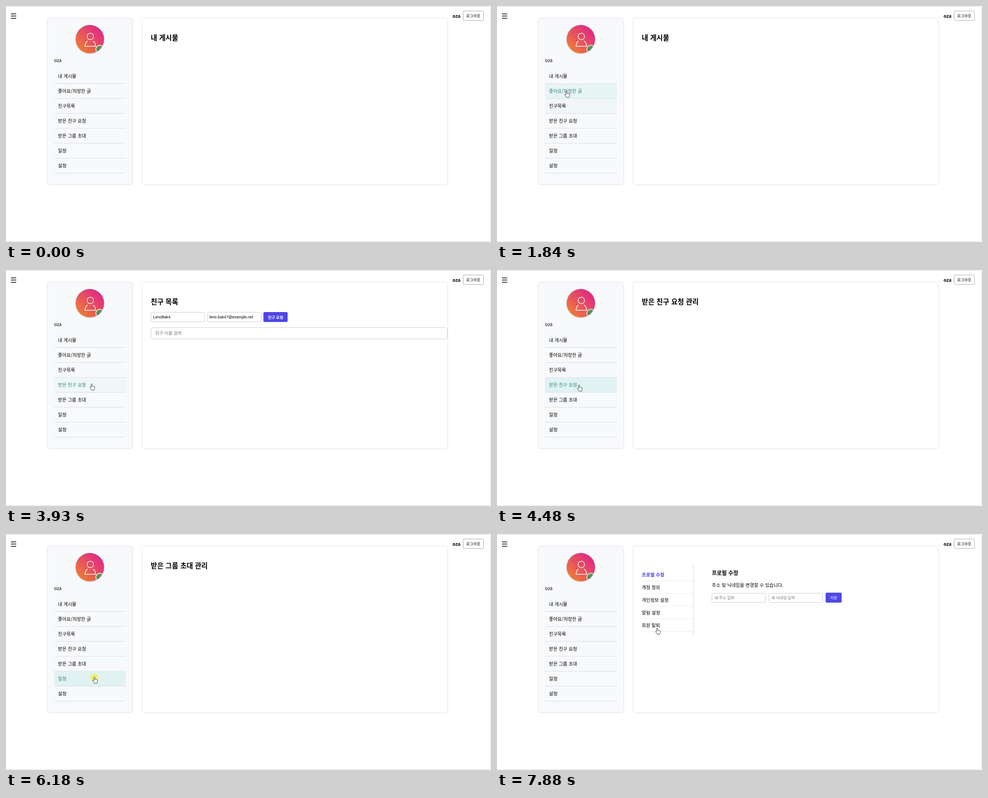
An HTML page for the animation above (8000 ms loop, 1073 px wide and 522 px high).

```html
<!DOCTYPE html>
<html lang="ko">
<head>
<meta charset="utf-8">
<style>
  html, body { margin: 0; width: 100%; height: 100%; overflow: hidden; background: #fff; }
  svg { display: block; width: 1073px; height: 522px; font-family: "Noto Sans CJK KR", "Noto Sans CJK", "Noto Sans", sans-serif; }
  .mono { font-family: "Liberation Sans", Arial, sans-serif; }
</style>
</head>
<body>
<svg id="stage" viewBox="0 0 1073 522"></svg>
<script>
const LOOP = 8000, FADE = 200;
const BODY = 10.24, SMALL = 8.53, TITLE = 15.36;
const INK = '#000', HOVER_INK = '#34807c', ACCENT = '#4f46e5', HINT = '#757575';

const text = (x, y, s, size = BODY, fill = INK, extra = '') =>
  `<text x="${x}" y="${y}" font-size="${size}" fill="${fill}" ${extra}>${s}</text>`;
const bold = (x, y, s, size, fill) => text(x, y, s, size, fill, 'font-weight="700"');
const box = (x, y, w, h, r, fill, stroke = 'none') =>
  `<rect x="${x}" y="${y}" width="${w}" height="${h}" rx="${r}" fill="${fill}" stroke="${stroke}"/>`;
const line = (d, stroke, width = 1) => `<path d="${d}" fill="none" stroke="${stroke}" stroke-width="${width}"/>`;
const title = s => bold(320.3, 75.6, s, TITLE);
const field = (x, y, h = 21) => box(x, y, 119, h, 3, '#fff', '#ccc');

const menu = ['내 게시물', '좋아요/저장한 글', '친구목록', '받은 친구 요청', '받은 그룹 초대', '일정', '설정'];
const tabs = ['프로필 수정', '계정 정보', '개인정보 설정', '알림 설정', '회원 탈퇴'];

const friends = title('친구 목록') +
  field(320.5, 93.5) + text(325.5, 107.3, 'LenoBak4', SMALL, INK, 'class="mono"') +
  field(445.5, 93.5) + text(450, 107.3, 'leno.bak47@example.net', SMALL, INK, 'class="mono"') +
  box(569.5, 93, 53.5, 22, 3, ACCENT) + bold(579.5, 107.5, '친구 요청', SMALL, '#fff') +
  box(320.5, 127.5, 656, 25, 5, '#fff', '#ccc') + text(330, 142.7, '친구 이름 검색', 9.6, HINT);

const settings = tabs.map((s, i) => {
  const y = 94 + 28 * i;
  return (i ? text(320.3, y, s) : bold(320.3, y, s, BODY, '#4338dd')) +
    line(`M320 ${y + 9.5}H434`, '#ededed');
}).join('') + line('M434.5 66V226', '#ddd') +
  bold(475.3, 91, '프로필 수정', 11.98) +
  text(475.3, 116.7, '주소 및 닉네임을 변경할 수 있습니다.') +
  field(475.5, 131, 20.5) + text(481, 144.2, '새 주소 입력', SMALL, HINT) +
  field(601.5, 131, 20.5) + text(607, 144.2, '새 닉네임 입력', SMALL, HINT) +
  box(727, 129.7, 35.5, 22, 2.5, ACCENT) + text(737, 144.2, '저장', SMALL, '#fff', 'font-weight="500"');

const pages = [
  title('내 게시물'),
  title('좋아요한 글') + bold(630, 75.6, '저장한 글', TITLE),
  friends,
  title('받은 친구 요청 관리'),
  title('받은 그룹 초대 관리'),
  title('일정'),
  settings
];

const avatar = `
  <defs>
    <linearGradient id="warm" x1="0.1" y1="0.9" x2="0.85" y2="0.15">
      <stop offset="0" stop-color="#f08030"/><stop offset=".5" stop-color="#e8525c"/><stop offset="1" stop-color="#e02a86"/>
    </linearGradient>
    <clipPath id="round"><circle cx="185.5" cy="73.5" r="31.5"/></clipPath>
  </defs>
  <circle cx="185.5" cy="74" r="33" fill="#e6ecf0"/>
  <circle cx="185.5" cy="73.5" r="32" fill="#b5dde2"/>
  <g clip-path="url(#round)">
    <circle cx="185.5" cy="73.5" r="31.5" fill="url(#warm)"/>
    <g fill="none" stroke="#fff" stroke-width="1.4">
      <circle cx="186.5" cy="67.3" r="7.2"/>
      <path d="M180.5 77.5C176.5 79.5 175 83 175 89.3H198C198 83 196.5 79.5 192.5 77.5"/>
    </g>
    <circle cx="207.5" cy="95.5" r="8.7" fill="#5c9150" stroke="#fff" stroke-width="1.5"/>
    <path d="M203 96.5h6l-2 3z" fill="#2f4a3c"/>
  </g>`;

const stage = document.getElementById('stage');
stage.innerHTML =
  box(-10, 0.5, 1082, 520.5, 5, '#fff', '#ddd') +
  line('M11 17.5H22.5M11 22.3H22.5M11 27.2H22.5', INK, 1.5) +
  bold(988, 25.6, 'oza', BODY) +
  box(1011.5, 11, 45, 21, 2.5, '#fff', '#aaa') + text(1018, 25, '로그아웃', SMALL) +
  box(91, 26.5, 189.5, 369, 6, '#f8f9fb', '#dee2e6') +
  box(301, 26.5, 676.5, 369, 6, '#fff', '#dee2e6') +
  avatar + text(106.3, 123.6, 'oza') +
  menu.map((s, i) => `<g class="item">${box(106.5, 138.5 + 33 * i, 158.5, 33, 0, '#e0f2f1')}` +
    line(`M106.5 ${171.5 + 33 * i}H264.5`, '#d9dde1') + text(115, 159.4 + 33 * i, s) + '</g>').join('') +
  pages.map(p => `<g class="page">${p}</g>`).join('') +
  `<g id="pointer">
    <circle id="ring" cy="1" r="8.6" fill="#f1f155" opacity=".88"/>
    <g fill="#fff" stroke="#111" stroke-width=".8" stroke-linejoin="round">
      <path id="hand" d="M-1.2 8V.9a1.2 1.2 0 0 1 2.4 0V5.2c.3-.7 2-.6 2.2.3 .4-.6 1.9-.4 2 .5 .5-.4 1.6-.1 1.6.8V9.5c0 2-1 2.6-1.2 4H-.4C-.6 11.8-2.6 10-3.7 8.2c-.6-1 .8-1.8 1.5-1.1z"/>
      <path id="arrow" d="M0 0V11.5l2.6-2.5 1.8 4.2 1.7-.8-1.8-4H8z"/>
    </g>
  </g>`;

// Pointer stops: time, x, y
const path = [
  [120, 929, 456], [890, 150, 156], [930, 150, 156], [1300, 158, 220],
  [1630, 158, 220], [1790, 153.8, 188.5], [2340, 153.8, 188.5], [2560, 161, 214.5],
  [3020, 161, 214.5], [3420, 455, 164], [3600, 400, 246], [3800, 330, 223],
  [3920, 189.5, 252], [4070, 181.5, 254.5], [4720, 181.5, 254.5], [5090, 194.3, 279.3],
  [5600, 194.3, 279.3], [5980, 195.5, 316.5], [6430, 195.5, 316.5], [6700, 197, 354],
  [7230, 197, 354], [7870, 354.5, 208]
];
// Each click shows the ring, then opens the next page
const clicks = [[1980, 2100], [2690, 2820], [4335, 4475], [5355, 5427], [6175, 6247], [6900, 7040]];

function pointerAt(t) {
  const n = path.findIndex(p => p[0] > t);
  if (n < 1) return (n ? path[path.length - 1] : path[0]).slice(1);
  const [t0, x0, y0] = path[n - 1], [t1, x1, y1] = path[n];
  const u = (t - t0) / (t1 - t0), k = u * u * (3 - 2 * u);
  return [x0 + (x1 - x0) * k, y0 + (y1 - y0) * k];
}

function hoveredAt(t) {
  const [x, y] = pointerAt(t);
  return x > 106 && x < 265 && y > 138.5 && y < 369.5 ? Math.floor((y - 138.5) / 33) : -1;
}

const items = [...stage.querySelectorAll('.item')];
const views = [...stage.querySelectorAll('.page')];
const $ = id => document.getElementById(id);
const show = (el, on) => el.setAttribute('display', on ? 'inline' : 'none');

function draw(t) {
  const page = clicks.filter(c => t >= c[1]).length;
  views.forEach((v, i) => show(v, i === page));

  // Highlight strength is the share of the last moments spent over the item
  const recent = Array.from({ length: 20 }, (_, j) => hoveredAt(t - j * FADE / 20));
  items.forEach((el, i) => {
    el.querySelector('rect').setAttribute('opacity', recent.filter(h => h === i).length / 20);
    el.querySelector('text').setAttribute('fill', recent[0] === i ? HOVER_INK : INK);
  });

  const [x, y] = pointerAt(t);
  const overTab = page === 6 && x > 320 && x < 434 && y > 76 && y < 216;
  const link = recent[0] >= 0 || overTab;
  $('pointer').setAttribute('transform', `translate(${x} ${y})`);
  show($('pointer'), t >= 120);
  show($('hand'), link);
  show($('arrow'), !link);
  show($('ring'), clicks.some(([a, b]) => t >= a && t < b));
}

const start = performance.now();
function tick() {
  draw((performance.now() - start) % LOOP);
  requestAnimationFrame(tick);
}
draw(0);
requestAnimationFrame(tick);
</script>
</body>
</html>
```
